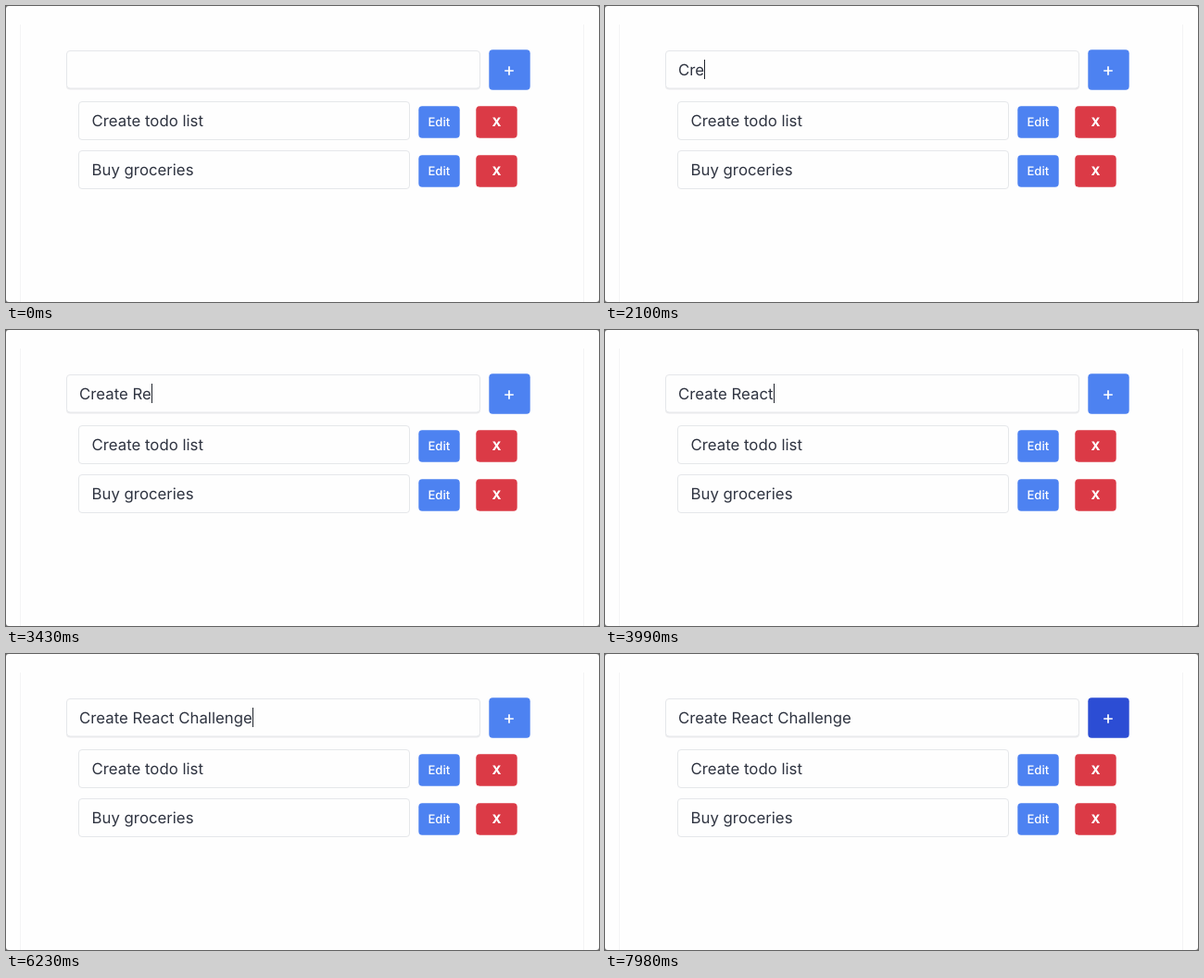
An HTML page for the animation above (8000 ms loop, 640 by 320 pixels).

```html
<!DOCTYPE html>
<html lang="en">
<head>
<meta charset="utf-8">
<title>Todo list</title>
<style>
html, body { margin: 0; width: 100%; height: 100%; overflow: hidden; background: #fefefe; }
svg { display: block; width: 640px; height: 320px; }
text { font-family: Inter, "Liberation Sans", sans-serif; white-space: pre; text-rendering: geometricPrecision; }
.body { font-size: 16.8px; fill: #2f3441; }
.label { font-size: 13.1px; font-weight: 500; fill: #fff; text-anchor: middle; }
.bold { font-weight: 800; }
.field { fill: #fefefe; stroke: #e5e7ea; }
.blue { fill: #4d82f1; }
.red { fill: #db3a46; }
.edge { fill: #f4f4f5; }
</style>
</head>
<body>
<svg viewBox="0 0 640 320">
  <rect width="640" height="320" fill="#777"/>
  <rect width="640" height="320" rx="3" fill="#fefefe"/>
  <rect class="edge" x="15" y="20" width="1" height="300"/>
  <rect class="edge" x="623" y="20" width="1" height="300"/>

  <rect x="65" y="49.5" width="447" height="41" rx="4" fill="#ededef"/>
  <rect class="field" x="65.5" y="48.5" width="446" height="40.5" rx="3.5"/>
  <text class="body" id="entry" x="79" y="75"></text>
  <rect id="caret" y="58" width="1" height="21" fill="#20242c"/>
  <rect class="blue" id="add" x="521.3" y="47.3" width="44.4" height="43.4" rx="4"/>
  <path d="M538.2 70h9.6M543 65.2v9.6" stroke="#fff" stroke-width="1.7"/>
  <g id="list"></g>
</svg>
<script>
const LOOP = 8000, HOVER = 7980;
const TEXT = "Create React Challenge";
// Time at which each letter appears
const KEYS = [1750, 1890, 2030, 2170, 2310, 2450, 2590,
  3290, 3430, 3570, 3710, 3990, 4340, 4620, 4900, 5040,
  5390, 5530, 5740, 5880, 6090, 6230];
// Spans in which the caret shows
const CARET = [[700, 1190], [1610, 3150], [3290, 6720], [7070, 7630]];

const get = id => document.getElementById(id);
const entry = get("entry"), caret = get("caret"), add = get("add");

const button = (x, y, color) =>
  `<rect class="${color}" x="${x + .3}" y="${y + .3}" width="44.4" height="34.4" rx="4"/>`;
const row = (y, name) => `
  <rect class="field" x="78.5" y="${y + .5}" width="357" height="41" rx="3.5"/>
  <text class="body" x="92.5" y="${y + 27}">${name}</text>
  ${button(445, y + 5, "blue")}
  <text class="label" x="467.3" y="${y + 27}">Edit</text>
  ${button(507, y + 5, "red")}
  <text class="label bold" x="529.5" y="${y + 27}">X</text>`;
get("list").innerHTML = row(103, "Create todo list") + row(156, "Buy groceries");

let shown = -1;
function draw(now) {
  const t = now % LOOP;
  const count = KEYS.filter(k => k <= t).length;
  if (count !== shown) {
    entry.textContent = TEXT.slice(0, count);
    const width = count ? entry.getComputedTextLength() : 0;
    caret.setAttribute("x", Math.round(79 + width));
    shown = count;
  }
  caret.style.opacity = CARET.some(([a, b]) => t >= a && t < b) ? 1 : 0;
  add.style.fill = t >= HOVER ? "#2c4dd4" : "";
}
function tick(now) {
  draw(now);
  requestAnimationFrame(tick);
}
draw(0);
requestAnimationFrame(tick);
</script>
</body>
</html>
```
